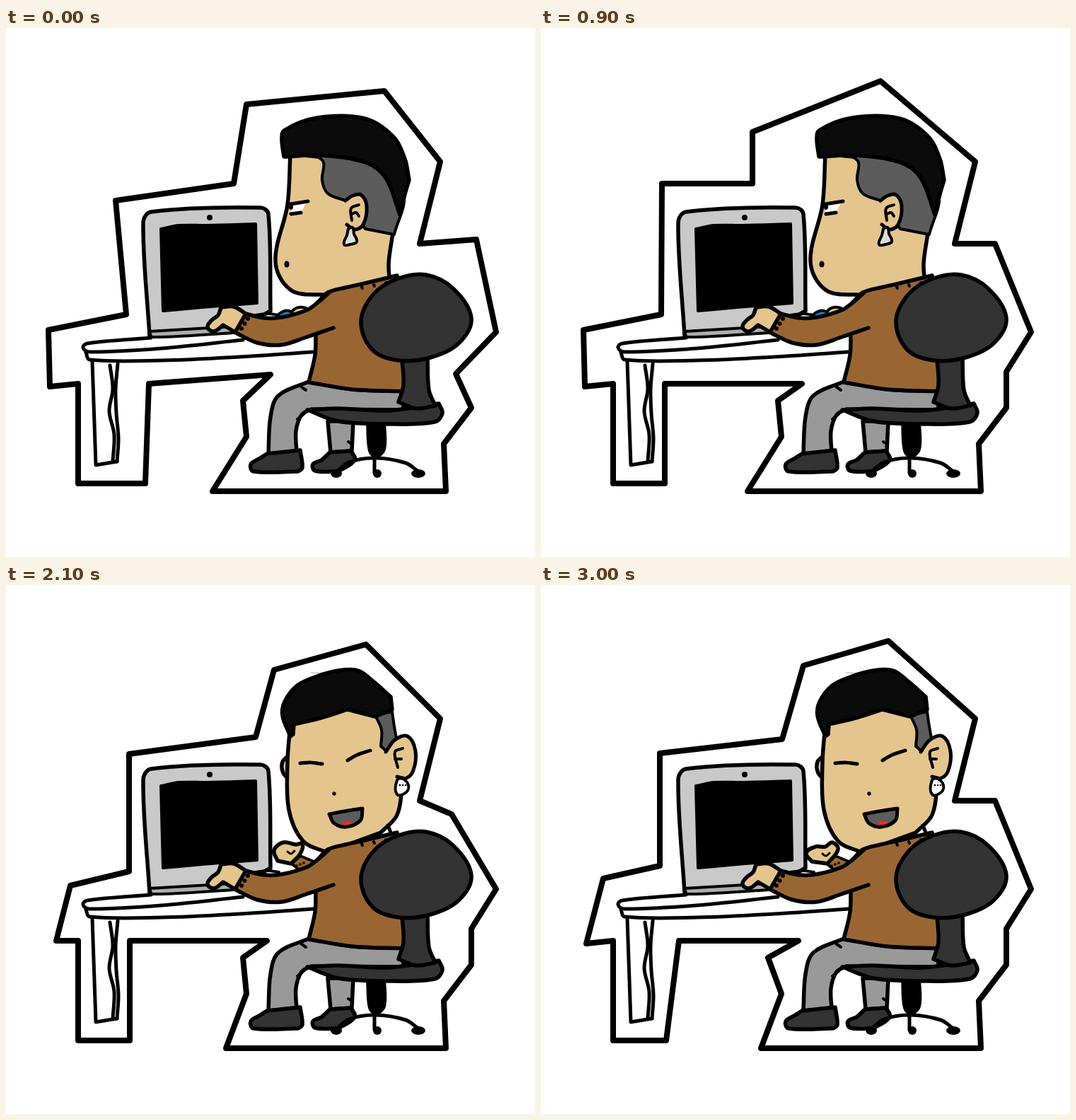
These frames come from a looping animation (748x748 px, 3.4 s). An HTML page with a canvas:

```html
<!DOCTYPE html>
<html lang="en">
<head>
<meta charset="utf-8">
<title>At the desk</title>
<style>
  html, body { margin: 0; width: 100%; height: 100%; overflow: hidden; background: #fff; }
  canvas { display: block; width: 748px; height: 748px; }
</style>
</head>
<body>
<canvas id="stage" width="748" height="748"></canvas>
<script>
const ctx = document.getElementById('stage').getContext('2d');
const SKIN = '#e4c58e', BROWN = '#996633', DARK = '#333', GREY = '#999', HAIR = '#0b0b0b', SIDE = '#5c5c5c';

// Smooth curve through key points; a point marked * is a sharp corner.
function curve(text, closed) {
  const pts = text.split(' ').flatMap(s => {
    const p = s.split(',').map(parseFloat);
    return s.endsWith('*') ? [p, p] : [p];
  });
  const n = pts.length;
  const at = i => closed ? pts[(i + n) % n] : pts[Math.max(0, Math.min(n - 1, i))];
  const path = new Path2D();
  path.moveTo(...pts[0]);
  for (let i = 0; i < (closed ? n : n - 1); i++) {
    const a = at(i), b = at(i + 1);
    const reach = Math.hypot(b[0] - a[0], b[1] - a[1]) / 3;
    const handle = (j, sign) => {
      const dx = at(j + 1)[0] - at(j - 1)[0], dy = at(j + 1)[1] - at(j - 1)[1];
      const k = sign * reach / (Math.hypot(dx, dy) || 1);
      return [at(j)[0] + dx * k, at(j)[1] + dy * k];
    };
    path.bezierCurveTo(...handle(i, 1), ...handle(i + 1, -1), ...b);
  }
  if (closed) path.closePath();
  return path;
}

function paint(path, fill, width) {
  if (fill) { ctx.fillStyle = fill; ctx.fill(path); }
  if (width) { ctx.lineWidth = width; ctx.stroke(path); }
}
const shape = (text, fill, width = 5.5) => paint(curve(text, true), fill, width);
const line = (text, width = 5, fill) => paint(curve(text, false), fill, width);

function dot(x, y, rx, ry = rx) {
  const p = new Path2D();
  p.ellipse(x, y, rx, ry, 0, 0, Math.PI * 2);
  paint(p, '#000');
}

function dots(x, y, dx, dy, r) {
  for (let i = 0; i < 3; i++) dot(x + i * dx, y + i * dy, r);
}

// Cut-out border: every pose moves a few corners of the same outline.
const border = {
  brow: [299, 147], peak: [480, 75], side: [642, 305], elbow: [693, 430], waist: [658, 486],
  foot: 311, knee: 335, hip: [369, 503], legIn: 175, legOut: 175,
  desk: [[62, 507], [60, 427]], corner: [170, 405], top: [171, 220], notch: [299, 220]
};
const typing = {
  ...border, face: 'profile', brow: [340, 108], peak: [535, 89], side: [665, 299], waist: [636, 489],
  foot: 292, hip: [374, 490], legIn: 202, legOut: 197, top: [155, 244], notch: [322, 220]
};
const tapping = { ...border, face: 'profile', foot: 292 };
const turning = { ...border, face: 'turn', elbow: [689, 437], foot: 317, corner: [155, 409] };
const laughing = {
  ...border, face: 'laugh', wave: true, brow: [379, 120], peak: [509, 84], side: [630, 324],
  desk: [[71, 503], [91, 425]], corner: [174, 405], top: [174, 239], notch: [353, 215]
};
const waving = {
  ...laughing, wave: false, brow: [371, 114], peak: [491, 79], side: border.side, knee: 321,
  hip: [364, 503], legIn: 195, legOut: 177, desk: [[64, 507], [88, 415]],
  corner: [168, 397], top: [168, 238], notch: [341, 218]
};

const STEP = 300;
const BEATS = [typing, tapping, typing, tapping, turning, turning, turning, laughing, waving, laughing, waving];
const LOOP = STEP * BEATS.length + 100;

function outline(b) {
  const pts = [
    b.brow, b.peak, [614, 189], [585, 305], b.side, b.elbow, b.waist, [658, 537], [619, 588],
    [622, 655], [b.foot, 655], [340, 578], [b.knee, 527], b.hip, [b.legIn, 503],
    [b.legOut, 644], [102, 644], [102, 503], ...b.desk, b.corner, b.top, b.notch
  ];
  if (b.face === 'turn') pts.splice(7, 1);
  paint(new Path2D('M' + pts.join('L') + 'Z'), null, 8);
}

function desk() {
  line('205,438 115,446 109,452 118,458 220,453 335,441');
  line('113,459 118,469 220,470 330,465 434,458');
  line('122,472 127,618* 157,613');
  line('147,477 151,510 146,542 153,575 151,613');
  line('158,475 155,510 156,545 159,580 157,613');
}

function computer() {
  shape('203,436* 194,275 205,260 360,254 371,263 374,400* 322,430*', '#c9c9c9');
  shape('203,429* 322,422* 322,431* 207,437', '#adadad', 4);
  shape('219,284* 245,279 285,279 353,277* 355,389* 290,394 222,400*', '#000', 4);
  dot(288, 268, 4);
}

function farHand({ face, wave }) {
  line('347,407 370,404 386,406', 4);
  if (face === 'laugh') {
    shape('404,394* 416,383* 440,393* 417,405*', BROWN, 4);
    dots(411, 397, 5, -2, 1.8);
    shape(wave ? '384,390* 379,375 392,364 410,367 419,366 416,380 403,394*'
               : '383,391* 375,379 388,370 402,370 412,364 420,374 405,394*', SKIN);
    const y = wave ? 377 : 380;
    line(`398,${y} 403,${y + 3} 408,${y - 1}`, 3);
    return;
  }
  const turn = face === 'turn';
  shape('384,410 394,400 405,403 402,412', turn ? '#fff' : '#1584d1', 4);
  shape('404,403 414,395 427,400 412,410', turn ? '#e9dfc9' : SKIN, 4);
}

function profile() {
  shape('402,178* 398,250 381,330 402,370 444,377 545,375* 541,335 547,290* 520,190*', SKIN);
  shape('438,180* 449,190 447,215 455,234 480,244* 508,284* 549,292* 562,232 520,187 470,178', SIDE, 4);
  shape('393,182* 390,158 393,145 440,127 507,128 547,153 564,185 570,215* 564,235 557,264* 537,212 508,190 445,180', HAIR);
  line('480,244* 490,237 502,236 510,252 505,278 493,285 482,278', 5, SKIN);
  line('499,250 488,255 489,272', 4);
  line('489,263 495,261 499,266', 4);
  shape('484,284* 490,282 492,291 496,302 487,306 478,306 482,293*', '#ddd', 4);
  shape('402,249* 424,247* 417,262* 403,263*', '#fff', 0);
  line('402,249 427,245');
  line('403,263 417,261');
  dot(403, 253, 3, 4);
  dot(397, 334, 3.5, 4.5);
}

function eye(x, y, w, rise, low) {
  shape(`${x + 2},${y}* ${x + w},${y - rise}* ${x + w - 2},${y + low - rise}* ${x + w / 4},${y + low}*`, '#fff', 0);
  line(`${x},${y} ${x + w},${y - rise}`);
  line(`${x + w / 4},${y + low} ${x + w - 2},${y + low - rise + 1}`);
  dot(x + w / 2 + 1, y, 4);
}

function frontHead(face) {
  ctx.strokeStyle = '#aaa';
  line('431,124 456,125', 1);
  ctx.strokeStyle = '#000';
  shape('402,240* 391,250 392,266 402,276*', SKIN);
  shape('402,198* 398,250 400,318 420,362 453,378* 530,350* 553,325 559,280 553,225* 525,170* 480,150', SKIN);
  line('544,350 540,340');
  shape('522,184* 546,179* 549,200 553,222* 538,235* 530,228* 531,205', SIDE, 4);
  line('537,236* 550,219 568,214 579,235 576,262 566,273 553,271', 5, SKIN);
  line('561,231 550,236 554,258', 4);
  line('550,246 559,246', 4);
  shape('402,214* 391,185 394,165 412,142 440,129 470,121 498,121 520,137 544,158* 546,176* 522,186* 483,176* 445,188 407,197* 406,211*', HAIR);
  shape('553,276 561,274 569,283 566,293 553,296', '#fff', 4);
  dots(557, 283, 4, 0, 1.3);
  dot(464, 295, 2.7);

  if (face === 'turn') {
    eye(419, 246, 20, 5, 15);
    eye(481, 239, 33, 5, 11);
    dot(481, 332, 3, 3.5);
    return;
  }
  line('416,252 430,251 447,253');
  line('483,248 497,240 515,234');
  const mouth = curve('457,324* 478,320 504,316* 501,333 481,342 464,337', true);
  ctx.save();
  ctx.clip(mouth);
  paint(mouth, SIDE);
  shape('474,341 484,334 493,341 484,345', '#f22b1d', 0);
  ctx.restore();
  paint(mouth, null, 5);
}

// Half a star, cut off at its centre line.
function spikes(x, y, outer, inner, tips, fill) {
  const pts = [];
  for (let i = 0; i <= tips * 2; i++) {
    const a = Math.PI * (0.5 + i / (tips * 2)), r = i % 2 ? outer : inner;
    pts.push([x + Math.cos(a) * r, y - Math.sin(a) * r * 0.8]);
  }
  const p = new Path2D('M' + pts.join('L'));
  paint(p, fill, 5);
}

function burst() {
  ctx.save();
  ctx.beginPath();
  ctx.rect(325, 160, 52, 65);
  ctx.clip();
  spikes(377, 193, 45, 28, 4, '#ff0');
  spikes(379, 194, 25, 12, 3, '#ff8238');
  ctx.restore();
  dot(125, 356, 1.3, 2);
}

function body() {
  shape('455,556* 459,600* 489,598* 491,556*', GREY);
  shape('458,600* 488,598* 493,611 470,627* 437,626 434,617 446,611', DARK);
  shape('428,500* 385,520 374,550 371,602* 411,600* 410,570 418,547 432,539* 562,540* 562,513* 490,511', GREY);
  line('412,553 421,546', 4);
  line('417,507 424,512', 4);
  line('484,585 489,588', 4);
  shape('369,602* 416,597* 419,622 413,627* 350,627 346,617 358,609', DARK);

  shape('441,388* 455,374 480,367 503,362* 553,350* 566,514* 490,511 428,501* 437,462 438,425*', BROWN);
  for (let i = 0; i < 3; i++) line(`${503 + i * 17},${366 - i * 3} ${504 + i * 17},${368 - i * 3}`, 4);
  line('456,375 441,388 425,399 390,409 365,410 339,404* 323,430* 355,445 390,448 425,437 463,424', 5.5, BROWN);
  dots(342, 411, -4.5, 7, 3);
  shape('304,395* 322,394 339,404* 324,430* 307,420* 294,429 285,423 291,413 300,406', SKIN);
}

function chair() {
  shape('510,556* 513,598 523,607 536,596 536,556*', '#000', 2);
  line('467,628 485,614 522,608 565,615 583,627');
  line('521,608 521,629');
  [8, 6, 10].forEach((r, i) => dot(467 + i * 58, 630, r, 6));
  shape('426,540* 470,538 540,541 612,531* 617,545 606,557 540,560 470,556', DARK);
  shape('560,468* 562,505 555,529* 580,538 607,534* 598,512 596,466*', DARK);
  shape('502,415 520,376 555,354 594,349 632,368 658,410 640,446 600,466 555,470 518,455', DARK);
}

function draw(t) {
  const pose = BEATS[Math.min(BEATS.length - 1, Math.floor(t / STEP))];
  ctx.fillStyle = '#fff';
  ctx.fillRect(0, 0, 748, 748);
  ctx.strokeStyle = '#000';
  ctx.lineJoin = ctx.lineCap = 'round';
  outline(pose);
  desk();
  computer();
  if (pose.face === 'turn') burst();
  if (pose.face === 'profile') profile();
  else frontHead(pose.face);
  farHand(pose);
  body();
  chair();
}

const start = performance.now();
function tick() {
  draw((performance.now() - start) % LOOP);
  requestAnimationFrame(tick);
}
tick();
</script>
</body>
</html>
```
